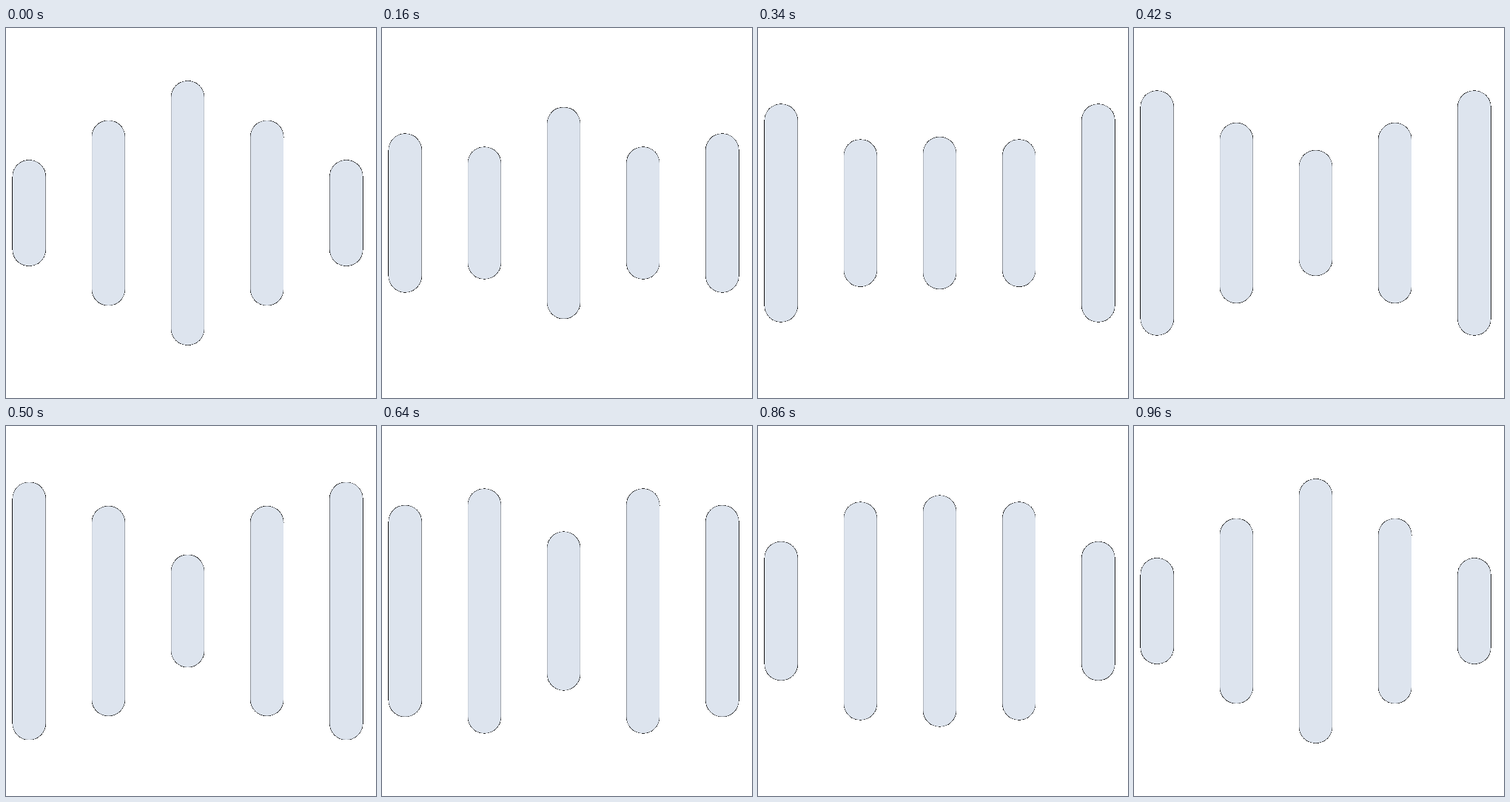
An HTML page that plays this animation: 500 px wide and 500 px high, repeating every 0.98 s.

```html
<!DOCTYPE html>
<html lang="en">
<head>
<meta charset="utf-8">
<title>Equalizer bars</title>
<style>
  html, body {
    margin: 0;
    width: 100%;
    height: 100%;
    overflow: hidden;
    background: #fff;
  }
  svg {
    display: block;
    width: 500px;
    height: 500px;
  }
  rect {
    width: 5px;
    rx: 2.5px;
    fill: #dde4ee;
    animation: 980ms infinite;
  }
  /* 20 ms ticks over 960 ms, then a 20 ms hold */
  .outer, .center { animation-timing-function: steps(24, end); }
  .inner { animation-timing-function: steps(12, end); }
  .outer { animation-name: outer; }
  .inner { animation-name: inner; }
  .center { animation-name: center; }

  @keyframes outer {
    0%, 97.95918%, 100% { y: 20px; height: 16px; }
    48.97959% { y: 8px; height: 40px; }
  }
  @keyframes inner {
    0%, 97.95918%, 100% { y: 14px; height: 28px; }
    24.48979% { y: 20px; height: 16px; }
    48.97959% { y: 12.5px; height: 31px; }
    73.46938% { y: 8px; height: 40px; }
  }
  @keyframes center {
    0%, 97.95918%, 100% { y: 8px; height: 40px; }
    48.97959% { y: 20px; height: 16px; }
  }
</style>
</head>
<body>
<svg viewBox="0 0 56 56">
  <!-- Backs every partly covered edge pixel with solid black -->
  <filter id="edge" filterUnits="userSpaceOnUse" x="0" y="0" width="56" height="56" color-interpolation-filters="sRGB">
    <feComponentTransfer in="SourceAlpha" result="back">
      <feFuncA type="linear" slope="100" intercept="-1"/>
    </feComponentTransfer>
    <feMerge>
      <feMergeNode in="back"/>
      <feMergeNode in="SourceGraphic"/>
    </feMerge>
  </filter>
  <g filter="url(#edge)">
    <rect class="outer" x="1"/>
    <rect class="inner" x="13"/>
    <rect class="center" x="25"/>
    <rect class="inner" x="37"/>
    <rect class="outer" x="49"/>
  </g>
</svg>
</body>
</html>
```
